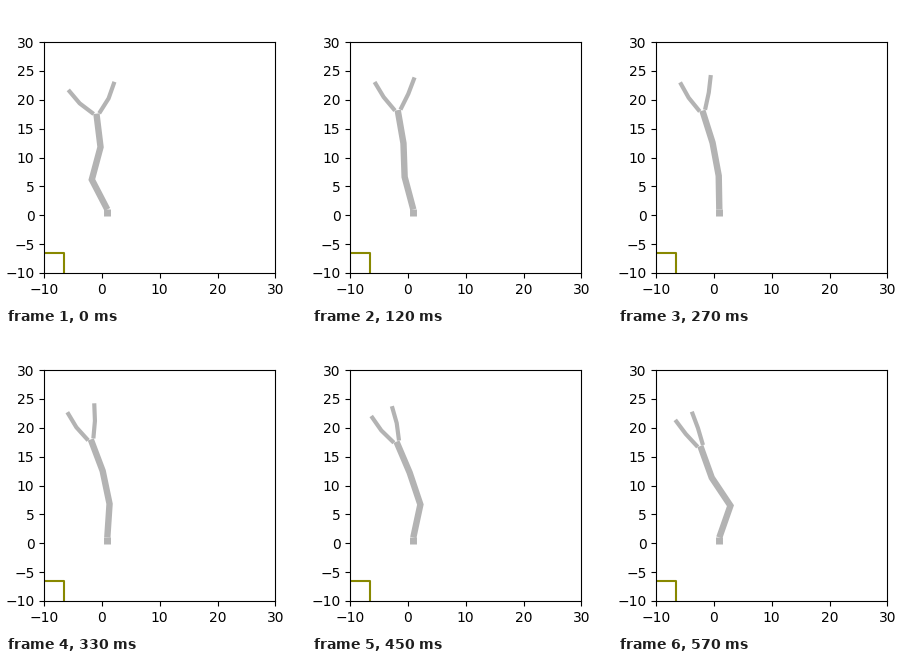
Animation, 300 px wide and 300 px high, one loop 0.6 s. Source, as a matplotlib script:

```python
import numpy as np
import matplotlib.pyplot as plt
from matplotlib.animation import FuncAnimation

FRAMES, INTERVAL = 20, 30
GRAY = "0.7"
BASE = np.array([0.92, 1.0])
ARM_LINK, FINGER_LINK, PALM = 5.83, 3.05, 0.48

# Each joint sweeps from start to end (degrees clockwise from up),
# bent by a half wave (swell) and a full wave (sway).
ARM = [(-27.4, 19.3, 4.3, 0), (15, -33.7, -1.5, -6), (-7, -19.8, -5, 3)]
LEFT = [(-52.8, -42.7, 8, 6), (-40.2, -36.9, 9, 3)]
RIGHT = [(32.3, -16.4, 2.5, 3), (19.4, -20.6, 5, 7)]


def headings(joints, u):
    start, end, swell, sway = np.transpose(joints)
    return np.radians(start + (end - start) * u
                      + swell * np.sin(np.pi * u)
                      + sway * np.sin(2 * np.pi * u))


def chain(root, angles, length):
    """Joint positions of a chain of equal links."""
    links = length * np.column_stack([np.sin(angles), np.cos(angles)])
    return np.vstack([root, root + np.cumsum(links, axis=0)])


fig, ax = plt.subplots(figsize=(3, 3), dpi=100)
ax.set_aspect("equal")
ax.set(xlim=(-10, 30), ylim=(-10, 30),
       xticks=range(-10, 31, 10), yticks=range(-10, 31, 5))

ax.plot([-13.5, -6.5, -6.5], [-6.5, -6.5, -13.5], color="#888800", lw=1.5)


def limb(width):
    return ax.plot([], [], color=GRAY, lw=width, solid_capstyle="butt",
                   solid_joinstyle="miter")[0]


base = limb(5)
base.set_data([BASE[0]] * 2, [-0.1, 1.1])
arm, left, right = limb(4.6), limb(3), limb(3)


def update(step):
    u = step / (FRAMES - 1)
    angles = headings(ARM, u)
    joints = chain(BASE, angles, ARM_LINK)
    arm.set_data(*joints.T)
    side = PALM * np.array([np.cos(angles[-1]), -np.sin(angles[-1])])
    for finger, bends, sign in ((left, LEFT, -1), (right, RIGHT, 1)):
        root = joints[-1] + sign * side
        finger.set_data(*chain(root, headings(bends, u), FINGER_LINK).T)
    return arm, left, right


anim = FuncAnimation(fig, update, frames=FRAMES, interval=INTERVAL,
                     repeat=True, repeat_delay=0)
plt.show()
```
